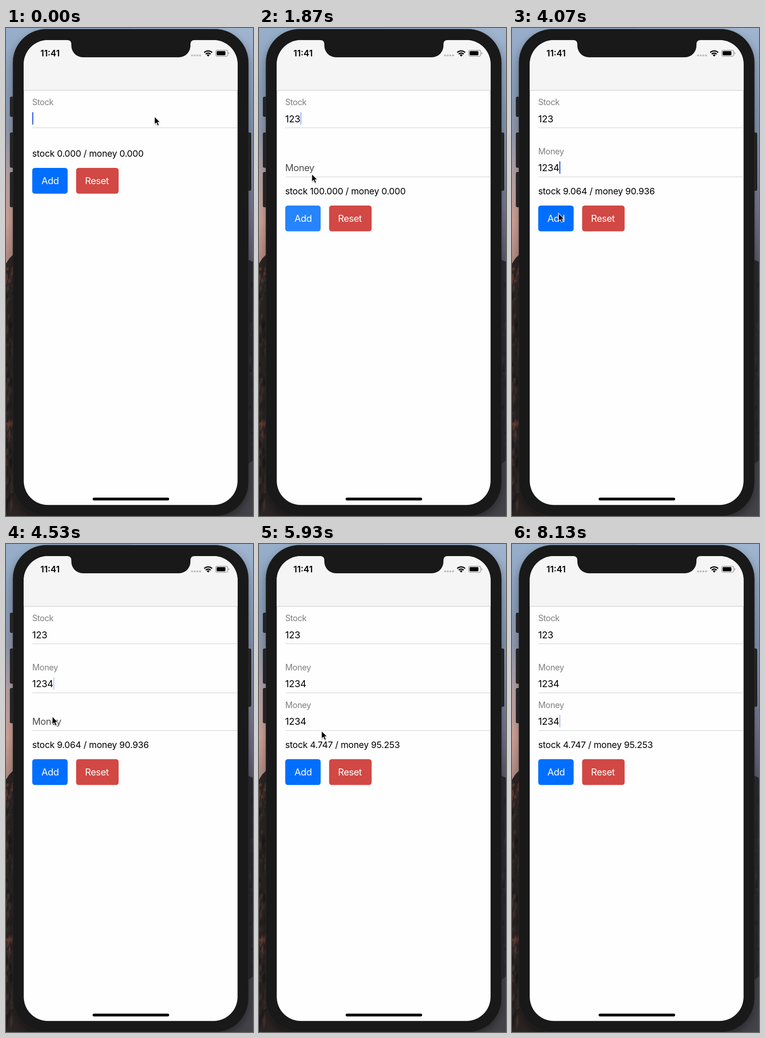
Recreate the animation shown at these times as an HTML page. Size 533 by 1050 pixels, loop 8.19 s.

```html
<!DOCTYPE html>
<html lang="en">
<head>
<meta charset="utf-8">
<title>Stock and money</title>
<style>
  html, body { margin: 0; width: 100%; height: 100%; overflow: hidden; background: #1a1a1a; }
  svg { display: block; width: 100%; height: 100%; }
  text { font: 400 20.3px Inter, Roboto, sans-serif; letter-spacing: -.025em; font-optical-sizing: none; white-space: pre; }
  .time { font-size: 18.7px; font-weight: 600; letter-spacing: 0; }
  .value { letter-spacing: -.01em; }
  .summary { font-size: 19.3px; letter-spacing: -.012em; }
  .btn { fill: #fff; }
</style>
</head>
<body>
<svg viewBox="0 0 533 1050" preserveAspectRatio="none">
  <defs>
    <linearGradient id="skyL" x2="0" y2="1">
      <stop offset="0" stop-color="#98afcb"/>
      <stop offset=".25" stop-color="#8a9db8"/>
      <stop offset=".42" stop-color="#8f98ad"/>
      <stop offset=".6" stop-color="#b3a0a6"/>
      <stop offset=".8" stop-color="#cda096"/>
      <stop offset="1" stop-color="#a98680"/>
    </linearGradient>
    <linearGradient id="skyR" x2="0" y2="1">
      <stop offset="0" stop-color="#a0b5d0"/>
      <stop offset=".4" stop-color="#8595b1"/>
      <stop offset=".75" stop-color="#77758d"/>
      <stop offset="1" stop-color="#5b5468"/>
    </linearGradient>
    <filter id="blur" x="-20%" width="140%"><feGaussianBlur stdDeviation="9"/></filter>
    <filter id="soft" x="-50%" y="-50%" width="200%" height="200%"><feGaussianBlur stdDeviation="1.3"/></filter>
    <clipPath id="screen"><rect x="38.300" y="26" width="461.400" height="1000.300" rx="52"/></clipPath>
  </defs>

  <rect width="270" height="520" fill="url(#skyL)"/>
  <rect x="270" width="263" height="520" fill="url(#skyR)"/>
  <path d="M0 507 7 496 16 487H120V1050H0Z" fill="#2b2423"/>
  <path d="M533 503 521 498H420V1050H533Z" fill="#2b2a31"/>
  <g id="rocks"></g>
  <path d="M533 930 518 942 440 1050H533Z" fill="#44434a"/>
  <rect x="15" y="10" width="508" height="1050" rx="72" opacity=".35" filter="url(#blur)"/>

  <g fill="#242424" stroke="#101010">
    <rect x="9" y="148.500" width="10" height="42" rx="2"/>
    <rect x="9" y="225.500" width="10" height="74.500" rx="2"/>
    <rect x="9" y="310.500" width="10" height="74.500" rx="2"/>
    <rect x="518" y="225.500" width="10.500" height="124" rx="2"/>
  </g>
  <rect x="15" y="2.500" width="508" height="1047.500" rx="72" fill="#191919" stroke="#2a2a2a" stroke-width=".8"/>

  <g clip-path="url(#screen)">
    <rect x="38" y="26" width="462" height="1001" fill="#fefefe"/>
    <rect x="38" y="26" width="462" height="108" fill="#f5f5f5"/>
    <rect x="38" y="133.700" width="462" height="1.100" fill="#cbcbcb"/>
    <g id="fields"></g>
    <g id="footer">
      <text id="summary" class="summary" x="56.500" y="277.300"></text>
      <g id="add">
        <rect x="56.600" y="301" width="76.400" height="55.500" rx="5.500" fill="#006fff"/>
        <text class="btn" x="76.500" y="336.200">Add</text>
      </g>
      <rect x="151.300" y="301" width="91.700" height="55.500" rx="5.500" fill="#d14844"/>
      <text class="btn" x="170.500" y="336.200">Reset</text>
    </g>
  </g>

  <path d="M132 25V26Q141 26 141 35V38A25 25 0 0 0 166 63H373A25 25 0 0 0 398 38V35Q398 26 407 26V25Z" fill="#191919"/>
  <text class="time" x="74.300" y="61">11:41</text>
  <g fill="#bdbdbd">
    <rect x="399.500" y="57" width="4" height="4" rx="1.300"/>
    <rect x="405.300" y="57" width="4" height="4" rx="1.300"/>
    <rect x="411" y="57" width="4" height="4" rx="1.300"/>
    <rect x="416.700" y="57" width="4" height="4" rx="1.300"/>
  </g>
  <g fill="none" stroke="#000" stroke-width="2.700">
    <path d="M427.800 52.800A12 12 0 0 1 444.800 52.800"/>
    <path d="M431 56.200A7.400 7.400 0 0 1 441.600 56.200"/>
  </g>
  <path d="M433.200 58.200A4.500 4.500 0 0 1 439.400 58.200L436.300 61.500Z"/>
  <rect x="452.500" y="47.800" width="26" height="13" rx="3.500" fill="none" stroke="#8e8e8e" stroke-width="1.200"/>
  <rect x="454.500" y="49.800" width="19" height="9" rx="1.800"/>
  <path d="M480 52.200Q481.800 52.800 481.800 54.300T480 56.400Z" fill="#8e8e8e"/>
  <rect x="187" y="1010.500" width="165" height="6" rx="3"/>

  <g id="mouse">
    <path d="M0 2V19L4 15.500 6.500 21 9.500 20 7 14H12Z" opacity=".4" filter="url(#soft)"/>
    <path d="M0 0V17L3.900 13.500 6.600 19.800 9.700 18.500 7 12.400H12.200Z" stroke="#fff" stroke-width="1.100"/>
  </g>
</svg>
<script>
const LOOP = 8190, BLINK = 1060, FLOAT = 150;
const $ = id => document.getElementById(id);
const clamp = x => Math.max(0, Math.min(1, x));
const mix = (a, b, k) => a + (b - a) * k;
const ease = k => k * k * (3 - 2 * k);

const presses = [1567, 4170];
const added = presses.map(p => p + 230);
// y: baseline of the value; keys: when each digit is typed
const fields = [
  { name: "Stock", y: 202.5, shown: 0, focus: -320, blur: 2500, keys: [760, 930, 1100] },
  { name: "Money", y: 308.3, shown: added[0], focus: 2700, blur: 4640, keys: [3190, 3370, 3550, 3720] },
  { name: "Money", y: 389.3, shown: added[1], focus: 4640, blur: LOOP, keys: [4780, 4880, 4970, 5060] }
];
const path = [
  [0, 320.5, 190.5], [350, 320.5, 190.5], [1150, 137, 314], [1280, 137, 314], [1500, 114, 314],
  [1950, 114, 314], [2400, 125, 304], [3700, 125, 304], [4100, 100, 400], [4390, 100, 400],
  [4520, 100, 371], [4650, 100, 376], [5200, 135, 402], [6300, 135, 402], [7100, 330, 335], [7700, 545, 240]
];

function make(parent, tag, attrs) {
  const el = document.createElementNS("http://www.w3.org/2000/svg", tag);
  set(el, attrs);
  return parent.appendChild(el);
}
function set(el, attrs) {
  for (const k in attrs) el.setAttribute(k, attrs[k]);
}

for (const f of fields) {
  f.g = make($("fields"), "g", {});
  make(f.g, "rect", { x: 57, y: f.y + 11.5, width: 460, height: 1.2, fill: "#d4d4d4" });
  f.label = make(f.g, "text", { x: 56.5 });
  f.label.textContent = f.name;
  f.value = make(f.g, "text", { class: "value", x: 56.5, y: f.y });
  f.caret = make(f.g, "rect", { y: f.y - 21.5, width: 2.5, height: 27, rx: 1, fill: "#3a63dc" });
}

let seed = 7;
const rnd = () => (seed = seed * 16807 % 2147483647) / 2147483647;
const tonesL = ["#1b1819", "#39302e", "#221e20", "#443532", "#2f2b2d"];
const tonesR = ["#222128", "#35333b", "#29272e"];
const pick = list => list[Math.floor(rnd() * list.length)];
for (let i = 0; i < 150; i++) {
  const right = i % 3 == 0, y = 512 + rnd() * 530;
  const x = (right ? 522 : -4) + rnd() * 16, h = 6 + rnd() * 20;
  const warm = !right && (y < 550 || y > 815 && y < 880) && rnd() < .6;
  const fill = warm ? "#6b4032" : pick(right ? tonesR : tonesL);
  make($("rocks"), "path", { d: `M${x} ${y}l${2 + rnd() * 4} ${-h / 2} 2 ${h * .7} -5 ${h * .6}z`, fill, opacity: .7 });
}

function caretAlpha(age) {
  const p = age % BLINK;
  return p < 890 ? clamp((870 - p) / 220) : (p - 890) / (BLINK - 890);
}

function drawField(f, t) {
  const n = f.keys.filter(k => t >= k).length, text = "1234".slice(0, n);
  const k = ease(clamp((t - f.focus) / FLOAT)), grey = Math.round(mix(76, 128, k));
  f.g.style.display = t >= f.shown ? "" : "none";
  f.label.style.fontSize = mix(20.3, 18, k) + "px";
  set(f.label, { y: f.y - 36.8 * k, fill: `rgb(${grey},${grey},${grey})` });
  f.value.textContent = text;
  const on = t >= f.focus && t < f.blur;
  set(f.caret, {
    x: 56.5 + (n ? f.value.getComputedTextLength() : 0),
    opacity: on ? caretAlpha(t - (n ? f.keys[n - 1] : f.focus)) : 0
  });
  return +text;
}

function drawMouse(t) {
  const i = path.findIndex(p => p[0] > t);
  let [, x, y] = path[path.length - 1];
  if (i > 0) {
    const a = path[i - 1], b = path[i], k = ease((t - a[0]) / (b[0] - a[0]));
    x = mix(a[1], b[1], k);
    y = mix(a[2], b[2], k);
  }
  set($("mouse"), { transform: `translate(${x} ${y})` });
}

function addAlpha(t) {
  const d = t - (t < presses[1] ? presses[0] : presses[1]);
  if (d < 0) return 1;
  return d < 100 ? 1 - .8 * d / 100 : Math.min(1, .2 + .8 * (d - 100) / 250);
}

function draw(now) {
  const t = now % LOOP;
  const [stock, a, b] = fields.map(f => drawField(f, t));
  const total = stock + a + b || 1;
  const share = v => (100 * v / total).toFixed(3);
  $("summary").textContent = `stock ${share(stock)} / money ${share(a + b)}`;
  set($("footer"), { transform: `translate(0 ${81 * added.filter(s => t >= s).length})` });
  set($("add"), { opacity: addAlpha(t) });
  drawMouse(t);
}

const start = performance.now();
function tick() {
  draw(performance.now() - start);
  requestAnimationFrame(tick);
}
tick();
</script>
</body>
</html>
```
